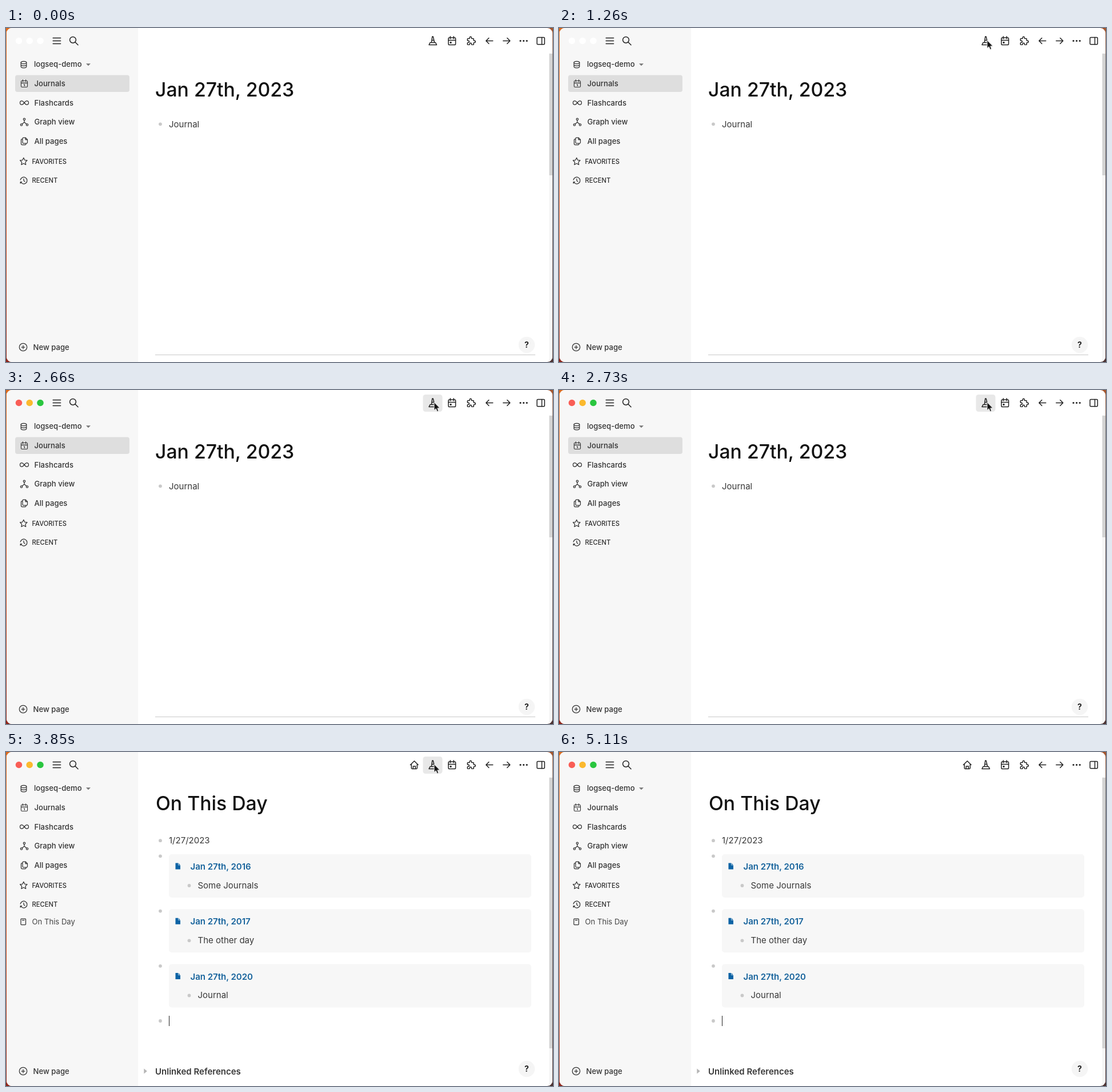
Animation of 957 by 585 pixels, one loop 5.32 s. Source, as an HTML page:

```html
<!DOCTYPE html>
<html lang="en">
<head>
<meta charset="utf-8">
<title>On This Day</title>
<style>
html, body { margin: 0; width: 100%; height: 100%; overflow: hidden; background: #fff; }
svg { display: block; width: 957px; height: 585px; }
text { font: 400 15px Inter, "Open Sans", sans-serif; fill: #383838; white-space: pre; }
.nav text { font-size: 13.1px; font-weight: 500; fill: #333; }
.nav .head { font-size: 11.2px; fill: #2c2c2c; }
.nav .recent { font-weight: 400; fill: #444; }
.title { font-size: 33.75px; font-weight: 500; fill: #111; }
.link { font-weight: 600; fill: #16639c; }
.strong { font-weight: 600; }
.icon { fill: none; stroke: #222; stroke-width: 1.5; stroke-linecap: round; stroke-linejoin: round; }
.thin { stroke: #333; stroke-width: 1.25; }
.dot { fill: #c9c9c9; }
.card { fill: #f7f7f7; }

/* One tick is 70 ms; 76 ticks make the loop. */
.lights, .journal, .day, .hover, .caret, .arrow, .beam { animation: 5320ms step-end infinite; }
.lights { animation-name: lights; }
.journal { animation-name: journal; }
.day { animation-name: day; }
.hover { animation-name: hover; }
.caret { animation-name: caret; }
.arrow { animation-name: arrow; }
.beam { animation-name: beam; }

@keyframes lights { 0% { opacity: 0; } 28.947%, 100% { opacity: 1; } }
@keyframes journal { 0% { opacity: 1; } 52.631%, 100% { opacity: 0; } }
@keyframes day { 0% { opacity: 0; } 52.631%, 100% { opacity: 1; } }
@keyframes hover {
  0% { opacity: 0; }
  34.21% { opacity: .05; }
  35.526% { opacity: .08; }
  47.368% { opacity: .4; }
  48.684% { opacity: .75; }
  50% { opacity: 1; }
  78.947% { opacity: .6; }
  80.263% { opacity: .2; }
  81.578%, 100% { opacity: 0; }
}
@keyframes caret {
  0% { opacity: 1; }
  63.157% { opacity: 0; }
  72.368% { opacity: 1; }
  81.578% { opacity: 0; }
  90.789%, 100% { opacity: 1; }
}
@keyframes arrow {
  0% { opacity: 0; transform: translate(547px, 510px); }
  7.894% { opacity: 1; transform: translate(547px, 510px); }
  9.21% { opacity: 1; transform: translate(608px, 385px); }
  10.526% { opacity: 1; transform: translate(683px, 235px); }
  11.842% { opacity: 1; transform: translate(748px, 118px); }
  13.157% { opacity: 1; transform: translate(777px, 71px); }
  14.473% { opacity: 1; transform: translate(776px, 54px); }
  15.789% { opacity: 1; transform: translate(771px, 40px); }
  17.105% { opacity: 1; transform: translate(764px, 28px); }
  18.421% { opacity: 1; transform: translate(756px, 24px); }
  19.736% { opacity: 1; transform: translate(751px, 22px); }
  21.052% { opacity: 1; transform: translate(749px, 21.5px); }
  78.947% { opacity: 1; transform: translate(742px, 60px); }
  80.263% { opacity: 1; transform: translate(716px, 140px); }
  81.578%, 100% { opacity: 0; transform: translate(716px, 140px); }
}
@keyframes beam {
  0% { opacity: 0; transform: translate(683px, 235px); }
  81.578% { opacity: 1; transform: translate(683px, 235px); }
  82.894% { opacity: 1; transform: translate(648px, 325px); }
  84.21% { opacity: 1; transform: translate(615px, 400px); }
  85.526% { opacity: 1; transform: translate(586.5px, 460.5px); }
  86.842% { opacity: 1; transform: translate(561px, 507px); }
  88.157% { opacity: 1; transform: translate(543px, 538px); }
  89.473% { opacity: 1; transform: translate(531px, 556px); }
  90.789% { opacity: 1; transform: translate(522px, 568px); }
  92.105% { opacity: 1; transform: translate(516px, 577px); }
  93.421% { opacity: 1; transform: translate(512px, 584px); }
  94.736% { opacity: 1; transform: translate(510px, 590px); }
  96.052%, 100% { opacity: 0; transform: translate(510px, 590px); }
}
</style>
</head>
<body>
<svg viewBox="0 0 957 585">
  <defs>
    <linearGradient id="wall" x2="0" y2="1">
      <stop offset="0" stop-color="#dd6a1c"/>
      <stop offset=".6" stop-color="#cf4a1c"/>
      <stop offset="1" stop-color="#8d2419"/>
    </linearGradient>
    <linearGradient id="edge" x2="0" y2="1">
      <stop offset="0" stop-color="#a5532a"/>
      <stop offset=".1" stop-color="#777"/>
      <stop offset="1" stop-color="#4a3030"/>
    </linearGradient>
    <clipPath id="window"><rect x="1" width="955" height="585" rx="9"/></clipPath>
    <g id="calendar">
      <rect x="-6.3" y="-5.7" width="12.6" height="12.6" rx="1.8"/>
      <path d="M-6.3-1.3H6.3M-3-8v4M3-8v4"/>
    </g>
    <g id="embed">
      <rect class="card" x="285" y="179" width="634" height="76" rx="5"/>
      <path d="M296.5 194.5h5l3.5 3.5v7.5h-8.500z" fill="#0b63a5"/>
      <path d="M301.500 194.500v3.500h3.500" fill="none" stroke="#f7f7f7" stroke-width=".7"/>
      <circle class="dot" cx="270" cy="182.300" r="2.900"/>
      <circle class="dot" cx="320.500" cy="234" r="2.900"/>
    </g>
  </defs>

  <rect width="957" height="585" fill="url(#wall)"/>
  <rect x="478" width="479" height="585" fill="url(#edge)"/>

  <g clip-path="url(#window)">
    <rect width="957" height="585" fill="#fff"/>
    <rect width="231" height="585" fill="#f7f7f7"/>
    <rect x="950" y="44" width="6" height="541" fill="#f7f7f7"/>

    <g fill="#fff"><circle cx="22.500" cy="22.500" r="5.800"/><circle cx="41.200" cy="22.500" r="5.800"/><circle cx="60" cy="22.500" r="5.800"/></g>
    <g class="lights">
      <circle cx="22.500" cy="22.500" r="5.800" fill="#f95e56"/>
      <circle cx="41.200" cy="22.500" r="5.800" fill="#fbb92e"/>
      <circle cx="60" cy="22.500" r="5.800" fill="#2ac63f"/>
    </g>

    <rect class="journal" x="16" y="82.500" width="200" height="29.500" rx="4" fill="#dedede"/>

    <g class="icon">
      <path d="M82.200 17.500h13.400M82.200 22.500h13.400M82.200 27.500h13.400"/>
      <circle cx="117" cy="20.800" r="5.400"/><path d="M121 24.800l5 5"/>
    </g>

    <g class="icon thin">
      <ellipse cx="31" cy="60.500" rx="4.800" ry="2.200"/>
      <path d="M26.200 60.500v7c0 3 9.600 3 9.600 0v-7M26.200 64c0 3 9.600 3 9.600 0"/>
      <g transform="translate(32 97.500) scale(.88)"><use href="#calendar"/><path d="M-.8 1.800H.5v2.700"/></g>
      <path d="M32 131c-2-2.500-3-3.300-4.200-3.300a3.300 3.300 0 0 0 0 6.600c1.200 0 2.200-.8 4.200-3.300s3-3.300 4.200-3.300a3.300 3.300 0 0 1 0 6.600c-1.200 0-2.200-.8-4.200-3.300z"/>
      <circle cx="32" cy="159.800" r="1.700"/><circle cx="27" cy="169.500" r="1.700"/><circle cx="37" cy="169.500" r="1.700"/>
      <path d="M32 161.500v3.500l-3.800 3.300M32 165l3.800 3.300"/>
      <path d="M34 192h-3.500a1.500 1.500 0 0 0-1.500 1.500v7a1.500 1.500 0 0 0 1.500 1.500h5.500a1.500 1.500 0 0 0 1.500-1.500v-5zv3.500h3.500M29 194.500h-1a1.500 1.500 0 0 0-1.500 1.500v7a1.500 1.500 0 0 0 1.500 1.500h5.500a1.500 1.500 0 0 0 1.500-1.500v-1"/>
      <path d="M30.800 227.300l1.900 4 4.400.6-3.200 3.100.8 4.400-3.900-2.100-3.900 2.100.8-4.400-3.200-3.100 4.400-.6z"/>
      <path d="M25.200 266a5.900 5.900 0 1 1 .4 3.600M25.200 272v-2.500h2.500M31 264v3.300l2 1.700"/>
      <circle cx="30" cy="559" r="6.700"/><path d="M27 559h6M30 556v6"/>
    </g>
    <path d="M140 62.300h8l-4 4z" fill="#777"/>

    <g class="nav">
      <text x="49" y="68.300">logseq-demo</text>
      <text x="49.500" y="102">Journals</text>
      <text x="49.500" y="135.700">Flashcards</text>
      <text x="49.500" y="169.300">Graph view</text>
      <text x="49.500" y="202.900">All pages</text>
      <text class="head" x="45.500" y="237.500">FAVORITES</text>
      <text class="head" x="45.500" y="271.200">RECENT</text>
      <text x="47.500" y="563.700">New page</text>
    </g>

    <rect class="hover" x="729.500" y="8" width="34" height="30" rx="4.500" fill="#e8e8e8"/>
    <g class="icon">
      <path d="M744.300 25.500l1.500-10.500h1.400l2.500 10.500M742 25.500h9.500l2 4h-13.500zM745.500 21.500h3"/>
      <g transform="translate(780.300 22.700)"><use href="#calendar"/><path d="M-3 2h1.500v1.500h-1.500z"/></g>
      <path transform="translate(805 13) scale(.78)" stroke-width="1.900" d="M4 7h3a1 1 0 0 0 1-1v-1a2 2 0 0 1 4 0v1a1 1 0 0 0 1 1h3a1 1 0 0 1 1 1v3a1 1 0 0 0 1 1h1a2 2 0 0 1 0 4h-1a1 1 0 0 0-1 1v3a1 1 0 0 1-1 1h-3a1 1 0 0 1-1-1v-1a2 2 0 0 0-4 0v1a1 1 0 0 1-1 1h-3a1 1 0 0 1-1-1v-3a1 1 0 0 1 1-1h1a2 2 0 0 0 0-4h-1a1 1 0 0 1-1-1v-3a1 1 0 0 1 1-1"/>
      <path d="M851.800 22.500h-12M844.800 17.500l-5 5 5 5M869.800 22.500h12M876.800 17.500l5 5-5 5"/>
      <rect x="929" y="16.500" width="13.300" height="12.300" rx="1.500"/><path d="M937.500 16.500v12.300"/>
    </g>
    <g fill="#222"><circle cx="900" cy="22.500" r="1.600"/><circle cx="905.600" cy="22.500" r="1.600"/><circle cx="911.200" cy="22.500" r="1.600"/></g>

    <g class="journal">
      <rect x="950.500" y="45" width="5.500" height="213" fill="#d4d4d4"/>
      <text class="title" x="261" y="119.500">Jan 27th, 2023</text>
      <circle class="dot" cx="270" cy="168.300" r="2.900"/>
      <text x="285" y="173.500">Journal</text>
      <path d="M261 572.500H926" stroke="#c8c8c8"/>
    </g>

    <g class="day">
      <rect x="950.500" y="45" width="5.500" height="474" fill="#d4d4d4"/>
      <g class="icon">
        <path d="M707.500 22.500l6.800-6.700 6.800 6.700M709.300 21.500v6.500a1.500 1.500 0 0 0 1.500 1.500h7a1.500 1.500 0 0 0 1.500-1.500v-6.500M712.300 29.500v-4.500h4v4.500"/>
        <path class="thin" d="M27 292h6.500a1 1 0 0 1 1 1v8.500a1 1 0 0 1-1 1h-6.500a1 1 0 0 1-1-1v-8.500a1 1 0 0 1 1-1zM28.500 294.500h3.500"/>
      </g>
      <g class="nav"><text class="recent" x="45.500" y="301.700">On This Day</text></g>

      <text class="title" x="262" y="102">On This Day</text>
      <circle class="dot" cx="270" cy="155.200" r="2.900"/>
      <text x="285" y="160.200">1/27/2023</text>

      <use href="#embed"/>
      <text class="link" x="322.500" y="206">Jan 27th, 2016</text>
      <text x="335.500" y="238.800">Some Journals</text>
      <use href="#embed" y="96.300"/>
      <text class="link" x="322.500" y="302.300">Jan 27th, 2017</text>
      <text x="335.500" y="335.100">The other day</text>
      <use href="#embed" y="192.500"/>
      <text class="link" x="322.500" y="398.500">Jan 27th, 2020</text>
      <text x="335.500" y="431.300">Journal</text>

      <circle class="dot" cx="270" cy="471" r="2.900"/>
      <rect class="caret" x="285" y="462" width="1" height="18" fill="#222"/>
      <path d="M241.300 554.500l5.500 4.500-5.500 4.500z" fill="#b5b5b5"/>
      <text class="strong" x="261" y="565">Unlinked References</text>
    </g>

    <circle cx="911" cy="555" r="14.300" fill="#f5f5f5"/>
    <text x="911" y="560" text-anchor="middle" style="font-size:14px;font-weight:700;fill:#222">?</text>

    <path class="arrow" d="M0 0v14.200l3.200-3 2.100 5 2.500-1-2.100-4.900h4.400z" fill="#111" stroke="#fff" stroke-width=".9"/>
    <g class="beam" fill="none">
      <path id="bar" d="M-3-7.500q3 0 3 2.500v10q0 2.500-3 2.500M3-7.500q-3 0-3 2.500M0 5q0 2.500 3 2.500M-1.800 2.500h3.600" stroke="#222" stroke-width="1.200"/>
    </g>
  </g>
</svg>
</body>
</html>
```
